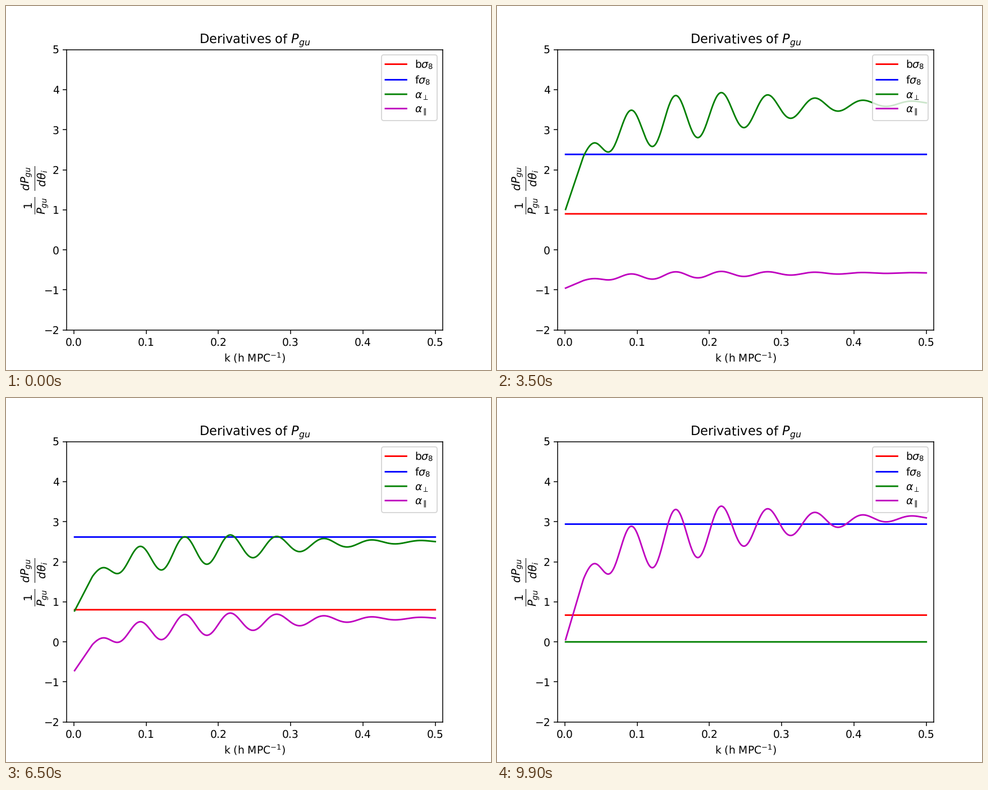
Write a matplotlib script that moves like this. It is 864x648 px and loops after 10000 ms.

```python
import numpy as np
import matplotlib.pyplot as plt
from matplotlib.animation import FuncAnimation

FRAMES = 100
B, F = 1.056, 0.44  # galaxy bias and growth rate, both times sigma_8


def spectral_slope(k):
    """Saturating trend with a damped acoustic wave; straight at small k."""
    x = k / 0.032
    trend = 3.367 * k / (k + 0.0421) + 0.28 * (x * np.exp(1 - x))**4
    damping = np.exp(-(k / 0.2013)**1.69)
    onset = 1 - np.exp(-(k / 0.045)**3)
    phase = 103 * k - 11.2 * k**2 - 2.93
    wave = 8.17 * k * damping * onset * np.cos(phase)
    return np.minimum(trend + wave, 61.2 * k - 0.006)


k = np.linspace(0.001, 0.5, 500)
slope = spectral_slope(k)
flat = np.ones_like(k)


def derivatives(mu):
    m2 = mu**2
    kaiser = B + F * m2
    angle = 1 + 2 * F * m2 / kaiser
    return (flat / kaiser,
            flat * (1 / F + m2 / kaiser),
            (1 - m2) * (slope + angle),
            m2 * slope - (1 - m2) * angle)


plt.rcParams["text.hinting"] = "none"
fig, ax = plt.subplots(figsize=(6.4, 4.8), dpi=135)
labels = [r"b$\sigma_8$", r"f$\sigma_8$",
          r"$\alpha_{\hspace{0.2}⟂}$", r"$\alpha_{\hspace{0.2}∥}$"]
lines = [ax.plot([], [], color=c, lw=1.5, label=s)[0]
         for c, s in zip("rbgm", labels)]

ax.set_xlim(-0.01, 0.51)
ax.set_ylim(-2, 5)
ax.set_title("Derivatives of $P_{gu}$")
ax.set_xlabel("k (h MPC$^{-1}$)", labelpad=3.2)
ax.set_ylabel(r"$\frac{1}{P_{gu}}\ \frac{dP_{gu}}{d\theta_i}$", fontsize=15)
ax.yaxis.set_label_coords(-0.043, 0.5)
legend = ax.legend(loc="upper right", labelspacing=0.32, borderpad=0.35)

# Keep level lines at their exact height instead of whole pixels.
for line in lines + legend.get_lines():
    line.set_snap(False)


def update(i):
    # The power vanishes at mu = 0, so nothing is drawn there.
    if i == 0:
        for line in lines:
            line.set_data([], [])
    else:
        for line, y in zip(lines, derivatives(i / (FRAMES - 1))):
            line.set_data(k, y)
    return lines


anim = FuncAnimation(fig, update, frames=FRAMES, interval=100,
                     repeat=True, repeat_delay=0, blit=False)
plt.show()
```
